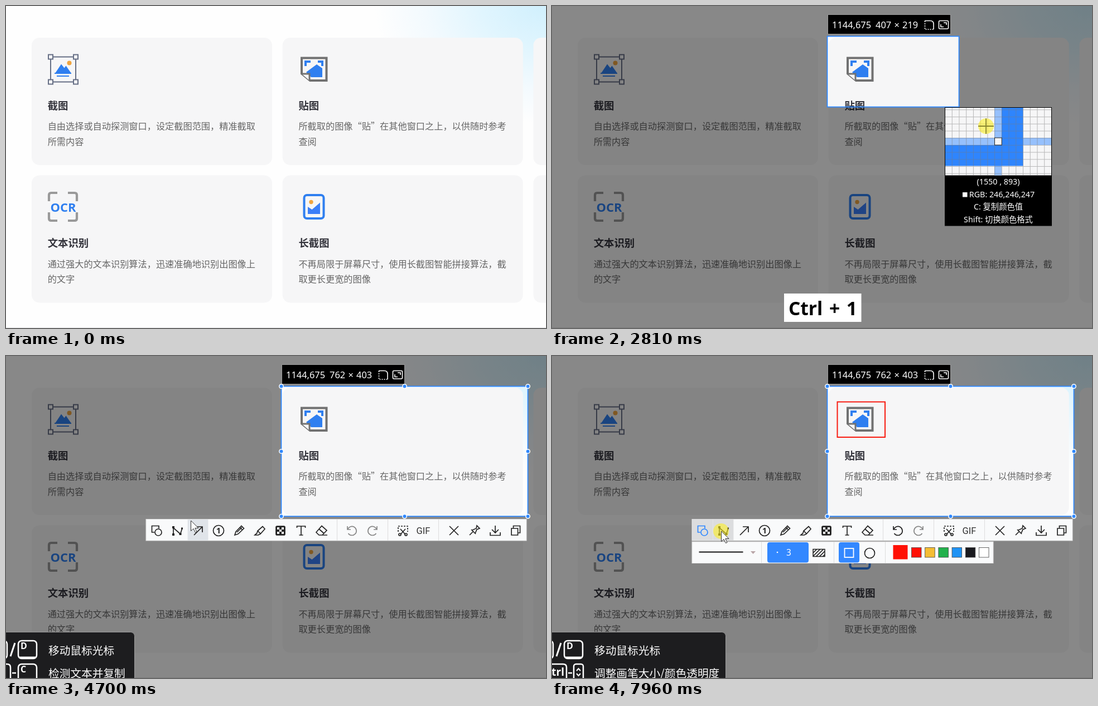
These frames come from a looping animation (968 by 579 pixels, 8000 ms). An HTML page:

```html
<!DOCTYPE html>
<html lang="zh-CN">
<head>
<meta charset="utf-8">
<style>
html, body { margin: 0; width: 100%; height: 100%; overflow: hidden; background: #fefefe }
svg { display: block; width: 968px; height: 579px; font-family: "Noto Sans", "Noto Sans CJK SC", "Noto Sans CJK", sans-serif }
.cjk { font-family: "Noto Sans CJK SC", "Noto Sans CJK", sans-serif }
.title { font-size: 18.4px; font-weight: 700; fill: #33333b }
.body { font-size: 16.2px; fill: #666 }
.line { fill: none; stroke: #222; stroke-width: 1.7 }
.white { fill: #fff }
</style>
</head>
<body>
<svg viewBox="0 0 968 579">
  <defs>
    <radialGradient id="sky">
      <stop offset="0" stop-color="#d1f0fd"/>
      <stop offset=".35" stop-color="#e0f5fe"/>
      <stop offset=".7" stop-color="#f3fafe"/>
      <stop offset="1" stop-color="#fefefe"/>
    </radialGradient>
    <pattern id="grid" width="12.73" height="12.73" y="4.2" patternUnits="userSpaceOnUse">
      <path d="M0 .5H13M.5 0V13" stroke="#777" stroke-opacity=".5" fill="none"/>
    </pattern>
    <pattern id="hatch" width="6" height="6" patternUnits="userSpaceOnUse">
      <path d="M-1 7L7-1M-1 1L1-1M5 7L7 5" stroke="#222" stroke-width="1.6"/>
    </pattern>
  </defs>

  <!-- Page -->
  <rect width="968" height="579" fill="#fefefe"/>
  <ellipse cx="960" cy="0" rx="300" ry="210" fill="url(#sky)"/>
  <path d="M0 578.5H968" stroke="#e4e4e6"/>
  <g id="cards"></g>

  <g fill="none" stroke="#666f85" stroke-width="2">
    <path d="M80 91.5H125V136.500H80Z"/>
    <path d="M76 87.500h8v8h-8zM121 87.500h8v8h-8zM76 132.500h8v8h-8zM121 132.500h8v8h-8z" fill="#f6f6f7"/>
  </g>
  <path d="M88 121L99 104.500l5.500 7 3-4L117 121z" fill="#2f7ff0"/>
  <path d="M87 121H117M91 126H113" stroke="#2f7ff0" stroke-width="2"/>
  <circle cx="113.500" cy="102.500" r="4" fill="#f0a540"/>

  <path d="M530 93.500H574.500V134H545L530 121.500Z" fill="none" stroke="#717171" stroke-width="4"/>
  <path d="M535 108V98h11v4h-7v6zM569 108V98h-10v4h6v6zM538 119l19-14 10 7v16H547z" fill="#2f7ff0"/>
  <path d="M530 122H544V134" fill="#f6f6f7" stroke="#717171" stroke-width="3"/>

  <path d="M77 351V340q0-4 4-4H92M111 336H123q4 0 4 4V351M127 371V382q0 4-4 4H111M92 386H81q-4 0-4-4V371" fill="none" stroke="#999" stroke-width="4.200"/>
  <text x="102.500" y="369.500" text-anchor="middle" font-size="22" font-weight="700" fill="#2f7ff0">OCR</text>

  <rect x="534.500" y="340" width="35" height="42" rx="5" fill="none" stroke="#2f7ff0" stroke-width="4"/>
  <circle cx="547" cy="352.500" r="3.700" fill="#f0a540"/>
  <path d="M541 361l7.500 5L563 353.500V374H541z" fill="#3b7ff8"/>

  <!-- Capture overlay -->
  <g id="capture">
    <path id="dim" fill-rule="evenodd" fill-opacity=".465"/>
    <rect id="frame" fill="none" stroke="#2f88ff" stroke-width="1.800"/>
    <rect x="494.500" y="15.500" width="220" height="35" stroke="#999"/>
    <text y="39.500" font-size="16.400" class="white"><tspan x="502">1144,675</tspan><tspan id="size" x="580" word-spacing="1"/></text>
    <g fill="none" stroke="#fff" stroke-width="1.600">
      <path d="M668 26.500h10q6 0 6 6V42"/>
      <path d="M668.500 27V42H685" stroke-dasharray="2 2"/>
      <rect x="693.500" y="26.500" width="17" height="14.500" rx="2"/>
      <path d="M702 30h5v4M697 33v4.500h5"/>
    </g>
  </g>

  <g id="help">
    <rect id="helpBox" x="-9" y="496.500" height="100" rx="7" fill="#1d1d1f" stroke="#999"/>
    <g fill="none" stroke="#fff" stroke-width="2.500">
      <rect x="-30" y="512" width="32" height="32" rx="6"/>
      <rect x="22" y="512" width="33" height="32" rx="6"/>
      <path d="M24 542H53M8 540L16 516" stroke-width="3"/>
    </g>
    <g class="white">
      <text x="26" y="527" font-size="16" font-weight="700">D</text>
      <g class="cjk" font-size="19.700">
        <text x="76" y="536.500">移动鼠标光标</text>
        <text id="hint" x="76" y="577.500"/>
      </g>
    </g>
    <g id="copyKeys" fill="none" stroke="#fff" stroke-width="2.500">
      <path d="M-9 554H2q6 0 6 6V590M11 570H18"/>
      <rect x="22" y="554" width="33" height="32" rx="6"/>
      <text x="26" y="569" font-size="16" font-weight="700" stroke="none" fill="#fff">C</text>
    </g>
    <g id="sizeKeys" fill="none" stroke="#fff" stroke-width="2.500">
      <path d="M-9 554H20q6 0 6 6V590M29 570H36"/>
      <rect x="39" y="554" width="17" height="32" rx="4"/>
      <path d="M44 566l3.500-4 3.500 4M44 571l3.500 4 3.500-4" stroke-width="2"/>
      <text x="22" y="575" text-anchor="end" font-size="19" font-weight="700" stroke="none" fill="#fff">Ctrl</text>
    </g>
  </g>

  <g id="drawing" fill="none" stroke="#f81b10" stroke-width="2">
    <rect id="box" x="511.500" y="82.500"/>
  </g>
  <g id="boxGrips" fill="#fff" stroke="#f81b10"></g>

  <g id="tools">
    <g id="grips" fill="#2f88ff" stroke="#fff" stroke-width="1.500"></g>
    <rect x="251" y="293.500" width="682" height="38.500" fill="#f9fafb" stroke="#ddd"/>
    <rect id="chosen" x="251.500" y="294" width="37" height="37.500" fill="#dcdddf"/>
    <rect id="hover" y="294" width="36.800" height="37.500" fill="#e0e4e9"/>
    <path d="M593.500 294V332M684.500 294V332M775.500 294V332" stroke="#ddd"/>
    <g class="line">
      <path id="shapes" d="M266 317H261.500V305.500H274V310M279 317a6 6 0 1 1-12 0a6 6 0 1 1 12 0"/>
      <path d="M300 320V309L312.500 320 315.500 311"/>
      <path d="M298 319h4v4h-4zM298 306h4v4h-4zM310.500 318h4v4h-4zM314 308.500h3v3h-3z" fill="#222" stroke="none"/>
      <path d="M337 322L352 307M342 307H352V317"/>
      <circle cx="381" cy="314" r="9.500"/>
      <path d="M410 322l2-6 10-10.500 4.500 4.500-10.500 10zM414 317l9-9M419 308l5 5"/>
      <path d="M446 322h6l4-2 8-9-4-4.500-9 8-1 4zM451 314l5 5.500"/>
      <rect x="484" y="306" width="16" height="16" rx="2" fill="#222"/>
      <path d="M486 308h4v4h-4zM494 308h4v4h-4zM490 312h4v4h-4zM486 316h4v4h-4zM494 316h4v4h-4z" fill="#fff" stroke="none"/>
      <path d="M521.500 309V306H536.500V309M529 306V322M525.500 322H532.500"/>
      <path d="M556 317l10-11.500 9 8-8 8.500h-6zM561 311l9 8M561 322H576"/>
      <path id="undo" d="M612 306V312H618M612.500 312a8 8 0 1 1 1 7"/>
      <path d="M665 306V312H659M664.500 312a8 8 0 1 0-1 7" stroke="#888"/>
      <path d="M703 316V306H720V316" stroke-dasharray="3 2"/>
      <path d="M707 311l9 10M716 311l-9 10"/><circle cx="706" cy="321" r="2"/><circle cx="717" cy="321" r="2"/>
      <path d="M795 306L811 322M811 306L795 322"/>
      <path d="M831 322l6-6M834 312l8 8M836 313l7-3 1-5 5 5-5 2-3 7"/>
      <path d="M877 305V318M871 312l6 6 6-6M868 317V322.500H886V317"/>
      <path d="M906 310h11.500v12H906zM909.500 310V305.500H921.500V318H917.500"/>
    </g>
    <text x="381" y="319" text-anchor="middle" font-size="14" font-weight="700" fill="#222">1</text>
    <text x="748" y="320" text-anchor="middle" font-size="16.500" font-family="Roboto, sans-serif" fill="#333">GIF</text>
  </g>

  <g id="options">
    <rect x="251" y="334" width="540" height="38.500" fill="#f9fafb" stroke="#ddd"/>
    <path d="M375.500 334V372M505.500 334V372M597.500 334V372" stroke="#ddd"/>
    <path d="M263.500 352.500H342.500" stroke="#111" stroke-width="2"/>
    <path d="M356 351h9l-4.500 5z" fill="#b9a5a7"/>
    <rect x="386" y="335" width="74" height="36.500" rx="4" fill="#3388ff"/>
    <circle cx="404" cy="353" r="1.300" class="white"/>
    <text x="420" y="359" font-size="15.500" class="white">3</text>
    <rect x="468" y="347.500" width="21" height="13" fill="url(#hatch)" stroke="#222" stroke-width="1.500"/>
    <rect x="514" y="335" width="37" height="36.500" rx="4" fill="#3388ff"/>
    <rect x="524.500" y="346" width="16" height="16" fill="none" stroke="#fff" stroke-width="1.800"/>
    <circle cx="569.500" cy="354.500" r="9" class="line"/>
    <rect x="611.500" y="340" width="26" height="25.500" fill="#ff1005"/>
    <g id="swatches" stroke="#444" stroke-width=".8"></g>
  </g>

  <g id="lens">
    <rect width="192" height="213.500"/>
    <rect id="lensPage" x="1" y="1" width="190" height="121.500"/>
    <path d="M89 1h13v121.500H89zM1 55H191v13H1z" fill="#96c0fc"/>
    <path id="lensEdge" d="M102 1h38.500V105.500H1V68H102z" fill="#2f85fd"/>
    <rect x="1" y="1" width="190" height="121.500" fill="url(#grid)"/>
    <rect id="lensDot" x="89.500" y="55" width="12.700" height="13" stroke="#222"/>
    <g class="white" font-size="14.300" text-anchor="middle">
      <text id="lensPos" x="96" y="139"/>
      <rect x="32" y="153" width="8.500" height="8.500"/>
      <text id="lensRgb" x="102.500" y="161.500"/>
      <text x="96" y="184">C: 复制颜色值</text>
      <text x="96" y="206.500">Shift: 切换颜色格式</text>
    </g>
  </g>

  <g id="badge">
    <rect x="416" y="517" width="138.500" height="51" fill="#fff"/>
    <text x="485.500" y="556" text-anchor="middle" font-size="33.500" font-weight="700" word-spacing="3">Ctrl + 1</text>
  </g>

  <g id="pointer">
    <circle id="press" r="14" fill="#fff01e" fill-opacity=".58"/>
    <path id="cross" d="M-14 0H14M0-14V14" stroke="#6d6a1c" stroke-opacity=".8" stroke-width="1.800"/>
    <path id="arrow" d="M.5 0V18.500L5 14.500 8.500 21.500 11 20.300 7.800 13.500H14z" fill="#fff" stroke="#333"/>
  </g>
</svg>
<script>
const el = id => document.getElementById(id);
const show = (id, on) => { el(id).style.display = on ? '' : 'none'; };
const set = (id, attrs) => { for (const k in attrs) el(id).setAttribute(k, attrs[k]); };
const within = (t, ...spans) => spans.some(([a, b]) => t >= a && t < b);

const LOOP = 8000, TICK = 10, LEFT = 493.5, TOP = 54.5, SCALE = .58;
const CAPTURE = 1950, DRAG = 2660, RELEASE = 3950, PICK = 5290;

// Pointer path: time, x, y
const path = [
  [200, 868, 300], [500, 690, 170], [880, 530, 66], [1100, 535, 47], [1500, 511, 64], [1900, 511, 64],
  [2200, 532, 70], [2500, LEFT, TOP], [2620, LEFT, TOP], [2751, 694, 159], [2776, 729.6, 181.6], [2810, 778, 216],
  [2950, 882, 281], [3256, 907.7, 297.6], [3290, 909.5, 298], [3800, 935.5, 288.3], [3950, 935.5, 288.3],
  [4280, 881, 316], [4370, 881, 322], [4540, 640, 312], [4700, 331, 296], [5100, 268, 312], [5420, 268, 312],
  [5650, 370, 200], [5920, 513, 86], [6050, 513, 86], [6080, 511.5, 82.5], [6310, 617, 158], [6510, 617, 158],
  [6720, 597, 146], [6920, 597, 146], [7200, 520, 200], [7680, 304, 314], [7820, 303, 315]
];
function pointAt(t) {
  const i = path.findIndex(p => p[0] > t);
  if (i < 1) return path[i ? path.length - 1 : 0].slice(1);
  const [t0, x0, y0] = path[i - 1], [t1, x1, y1] = path[i], k = (t - t0) / (t1 - t0);
  return [x0 + (x1 - x0) * k, y0 + (y1 - y0) * k];
}

const texts = [
  ['截图', '自由选择或自动探测窗口，设定截图范围，精准截取', '所需内容'],
  ['贴图', '所截取的图像“贴”在其他窗口之上，以供随时参考', '查阅'], null,
  ['文本识别', '通过强大的文本识别算法，迅速准确地识别出图像上', '的文字'],
  ['长截图', '不再局限于屏幕尺寸，使用长截图智能拼接算法，截', '取更长更宽的图像'], null
];
el('cards').innerHTML = texts.map((text, i) => {
  const x = 46 + i % 3 * 449.7, y = 57 + (i > 2) * 247.5;
  const line = (s, dy, style) => `<text class="cjk ${style}" x="${x + 28.7}" y="${y + dy}">${s}</text>`;
  return `<rect x="${x}" y="${y}" width="431" height="229" rx="14" fill="#f6f6f7"/>` +
    (text ? line(text[0], 128.7, 'title') + line(text[1], 165, 'body') + line(text[2], 192.7, 'body') : '');
}).join('');

const grips = (x0, y0, x1, y1, r) => [0, .5, 1].flatMap(u => [0, .5, 1].map(v =>
  u == .5 && v == .5 ? '' : `<circle cx="${x0 + (x1 - x0) * u}" cy="${y0 + (y1 - y0) * v}" r="${r}"/>`)).join('');
el('grips').innerHTML = grips(LEFT, TOP, 935.5, 288.3, 3.7);
el('boxGrips').innerHTML = grips(511.5, 82.5, 597, 146, 2);
el('swatches').innerHTML = ['#ff1005', '#f4bd34', '#22b14c', '#1f93f5', '#1a1a1f', '#fff'].map((c, i) =>
  `<rect x="${644.5 + i * 24.2}" y="344.500" width="17.500" height="17.500" fill="${c}"/>`).join('');

const buttons = [270, 307, 344, 381, 418, 455, 492, 529, 566, 620, 657, 711, 748, 803, 840, 877, 914];

function draw(t) {
  // The selection and the lens trail behind the pointer
  const [x, y] = pointAt(t), [lx, ly] = pointAt(t - 59);
  const [cx, cy] = pointAt(Math.min(t - 34, 3850));
  const w = Math.max(0, Math.round((cx - LEFT) / SCALE)), h = Math.max(0, Math.round((cy - TOP) / SCALE));
  const picked = t >= PICK, ready = t >= RELEASE, dragging = within(t, [DRAG, RELEASE]);

  show('capture', t >= DRAG);
  if (t >= DRAG) {
    const right = LEFT + w * SCALE, bottom = TOP + h * SCALE;
    set('dim', { d: `M0 0H968V579H0ZM${LEFT} ${TOP}H${right}V${bottom}H${LEFT}Z` });
    set('frame', { x: LEFT, y: TOP, width: right - LEFT, height: bottom - TOP });
    el('size').textContent = `${w} × ${h}`;
  }

  show('lens', within(t, [CAPTURE, RELEASE]));
  const white = cy > 286, page = white ? '#fff' : '#f6f6f7';
  set('lens', { transform: `translate(${Math.round(lx + 10)} ${Math.round(ly + 23)})` });
  set('lensPage', { fill: page });
  set('lensDot', { fill: page });
  show('lensEdge', dragging);
  el('lensPos').textContent = dragging ? `(${1143 + w} ,  ${674 + h})`
    : `(${Math.round(1144 + (cx - LEFT) / SCALE)} ,  ${Math.round(675 + (cy - TOP) / SCALE)})`;
  el('lensRgb').textContent = 'RGB: ' + (white ? '255,255,255' : '246,246,247');

  show('help', ready || within(t, [CAPTURE, DRAG]));
  set('helpBox', { width: picked ? 320.5 : 239.5 });
  el('hint').textContent = picked ? '调整画笔大小/颜色透明度' : '检测文本并复制';
  show('copyKeys', !picked);
  show('sizeKeys', picked);

  show('tools', ready);
  show('options', picked);
  show('chosen', picked);
  el('shapes').style.stroke = picked ? '#2f88ff' : '';
  el('undo').style.stroke = t < 6920 ? '#888' : '';
  const over = y > 293 && y < 332 && buttons.find(b => Math.abs(x - b) <= 18.5);
  show('hover', over && !(picked && over == 270));
  if (over) set('hover', { x: over - 18.4, fill: picked ? '#dcdddf' : '#e0e4e9' });

  show('drawing', t >= 6090);
  const [bx, by] = pointAt(Math.min(t, 6720));
  if (t >= 6090) set('box', { width: Math.max(0, bx - 511.5), height: Math.max(0, by - 82.5) });
  show('boxGrips', within(t, [6730, 7900]));

  show('badge', within(t, [500, 1400], [1950, 3050]));
  const cross = within(t, [CAPTURE, RELEASE]) || (t > 5500 && y < 289);
  show('pointer', t >= 200);
  set('pointer', { transform: `translate(${x} ${y})` });
  show('press', within(t, [2540, 3900], [5230, 5420], [6030, 6720], [7900, LOOP]));
  show('cross', cross);
  show('arrow', !cross);
}

function tick() {
  const t = performance.now() % LOOP;
  draw(t - t % TICK);
  requestAnimationFrame(tick);
}
tick();
</script>
</body>
</html>
```
